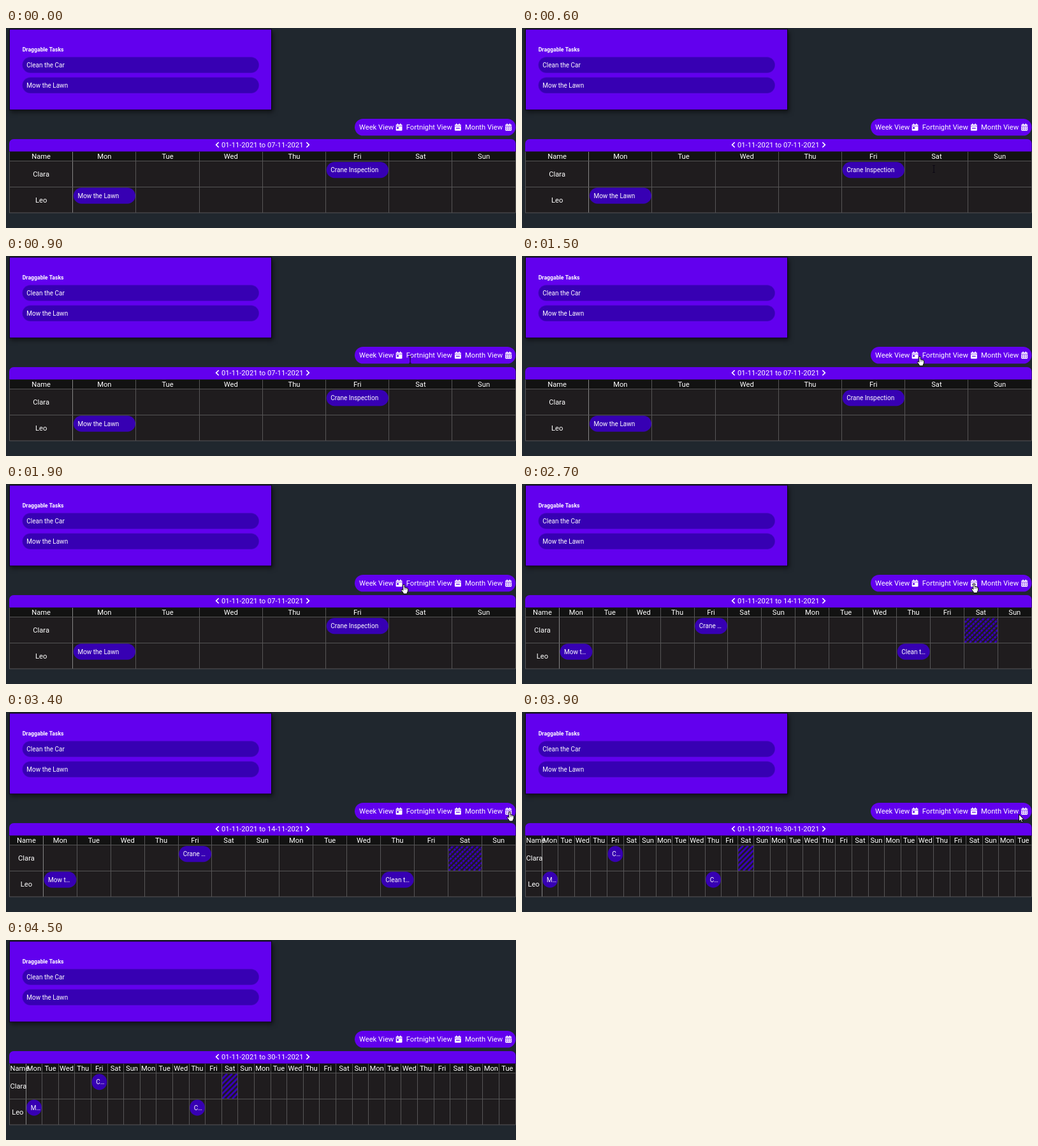
Write an HTML page with a canvas that moves like this. It is 800x315 px and loops after 5.1 s.

```html
<!DOCTYPE html>
<html lang="en">
<head>
<meta charset="utf-8">
<title>Task planner</title>
<style>
html, body { margin: 0; width: 100%; height: 100%; overflow: hidden; background: #20272e; }
canvas { display: block; width: 800px; height: 315px; }
</style>
</head>
<body>
<canvas id="stage"></canvas>
<script>
const W = 800, H = 315, LOOP = 5100, STEP = 100, LAST = 4500;
const PURPLE = '#6200ee', DEEP = '#3700b3', CELL = '#1f1c1e', HEAD = '#121212', GRID = '#565556';
const DAYS = ['Mon', 'Tue', 'Wed', 'Thu', 'Fri', 'Sat', 'Sun'];
const LEFT = 5.5, RIGHT = 799.2;
const ROWS = [{ name: 'Clara', y: 210 }, { name: 'Leo', y: 250.5 }];

const VIEWS = [
  { from: 0, days: 7, end: '07', labels: ['Crane Inspection', 'Mow the Lawn', ''] },
  { from: 2600, days: 14, end: '14', labels: ['Crane …', 'Mow t…', 'Clean t…'] },
  { from: 3600, days: 30, end: '30', labels: ['C…', 'M…', 'C…'] }
];
// day column and row of each event
const EVENTS = [[5, 0], [1, 1], [11, 1]];
const OFF_DAY = 13;

// cursor path: time, x, y
const PATH = [
  [600, 646, 222], [900, 634, 163.5], [1200, 626, 159], [1500, 624, 158], [1900, 624, 158],
  [2300, 709, 156.5], [2700, 709, 156.5], [3200, 790, 157], [3600, 790, 157],
  [3900, 779.5, 161], [4300, 748, 222]
];

const canvas = document.getElementById('stage');
const ctx = canvas.getContext('2d');
const dpr = window.devicePixelRatio || 1;
canvas.width = W * dpr;
canvas.height = H * dpr;

function rect(x, y, w, h, color) {
  ctx.fillStyle = color;
  ctx.fillRect(x, y, w, h);
}

function round(x, y, w, h, r, color) {
  ctx.beginPath();
  ctx.roundRect(x, y, w, h, r);
  ctx.fillStyle = color;
  ctx.fill();
}

function text(str, x, y, size = 11.2, align = 'left', weight = 400) {
  ctx.font = `${weight} ${size}px Roboto, Arial, sans-serif`;
  ctx.textAlign = align;
  ctx.fillStyle = '#fff';
  ctx.fillText(str, x, y);
}

function poly(points) {
  ctx.beginPath();
  points.forEach(([x, y]) => ctx.lineTo(x, y));
}

// Centred text that starts at the cell edge when it does not fit
function fitText(str, x, w, y) {
  ctx.font = '400 11.2px Roboto, Arial, sans-serif';
  const tw = ctx.measureText(str).width;
  text(str, x + Math.max(1, (w - tw) / 2), y);
}

function shadow(blur, dx, dy, color) {
  ctx.shadowBlur = blur * dpr;
  ctx.shadowOffsetX = dx * dpr;
  ctx.shadowOffsetY = dy * dpr;
  ctx.shadowColor = color;
}

function drawTasks() {
  ctx.save();
  shadow(7, 2, 3, 'rgba(0,0,0,.55)');
  rect(5, 1.5, 412, 128, '#0b0712');
  ctx.restore();
  rect(6, 2.5, 410, 126, PURPLE);
  text('Draggable Tasks', 25.7, 37.3, 8.7, 'left', 700);
  ['Clean the Car', 'Mow the Lawn'].forEach((task, i) => {
    const y = 45.5 + i * 32;
    round(25.5, y, 371.5, 25.5, 12.7, '#4a05c8');
    round(26.2, y + .7, 370.1, 24.1, 12, DEEP);
    text(task, 32.3, y + 16.3, 10);
  });
}

function calendar(x, kind) {
  const y = 150.4;
  round(x, y + 1.5, 9.9, 9.8, 1.2, '#fff');
  round(x + 2, y, 1.6, 3, .4, '#fff');
  round(x + 6.3, y, 1.6, 3, .4, '#fff');
  rect(x, y + 3.5, 9.9, .7, PURPLE);
  if (kind === 'day') rect(x + 1.5, y + 5.6, 2.8, 2.8, PURPLE);
  if (kind === 'minus') rect(x + 2, y + 6.8, 5.9, 1.3, PURPLE);
  if (kind === 'grid') {
    for (let i = 0; i < 6; i++) rect(x + 1.4 + (i % 3) * 2.8, y + 5.3 + (i > 2 ? 2.8 : 0), 1.5, 1.5, PURPLE);
  }
}

function drawButtons() {
  round(547, 143, 252.5, 26.5, 13.2, PURPLE);
  text('Week View', 554, 160.2);
  calendar(611.6, 'day');
  text('Fortnight View', 627.8, 160.2);
  calendar(703.9, 'minus');
  text('Month View', 720, 160.2);
  calendar(783.2, 'grid');
}

function chevron(x, dir) {
  ctx.strokeStyle = '#fff';
  ctx.lineWidth = 1.7;
  poly([[x - 2 * dir, 180], [x + 2 * dir, 184], [x - 2 * dir, 188]]);
  ctx.stroke();
}

function hatch(x, y, w, h, dashed) {
  ctx.save();
  ctx.beginPath();
  ctx.rect(x, y, w, h);
  ctx.clip();
  ctx.strokeStyle = DEEP;
  ctx.lineWidth = 3;
  if (dashed) ctx.setLineDash([4, 1]);
  for (let d = 0; d < w + h; d += 7.9) {
    poly([[x + d - h, y + h], [x + d, y]]);
    ctx.stroke();
  }
  ctx.restore();
}

function drawTable(view) {
  const n = view.days + 1, cw = (RIGHT - LEFT) / n;
  const colX = i => LEFT + i * cw;

  round(5, 175, 794.5, 20, [7, 7, 0, 0], PURPLE);
  chevron(331.7, -1);
  text(`01-11-2021 to ${view.end}-11-2021`, 402.2, 188.4, 11.2, 'center');
  chevron(473.3, 1);

  rect(5, 194.5, 794.5, 15.5, HEAD);
  rect(5, 210, 794.5, 81, CELL);
  hatchDay(view, colX, cw);

  for (let i = 0; i <= n; i++) {
    const x = Math.floor(colX(i));
    rect(x, 195, 1, 96, i === 1 ? '#858585' : GRID);
  }
  [209, 250, 290.5].forEach(y => rect(5, y, 794.5, 1, GRID));

  fitText('Name', LEFT, cw, 206.4);
  for (let i = 1; i < n; i++) text(DAYS[(i - 1) % 7], colX(i) + cw / 2, 206.4, 11.2, 'center');
  ROWS.forEach(row => fitText(row.name, LEFT, cw, row.y + 24.2));

  EVENTS.forEach(([day, row], i) => {
    if (day > view.days) return;
    const x = colX(day) + 1.1, y = ROWS[row].y + 1;
    round(x, y, cw - 2, 25.3, Math.min(12.6, cw / 2 - 1), DEEP);
    text(view.labels[i], x + 6.6, y + 16.1, 10);
  });
}

function hatchDay(view, colX, cw) {
  if (OFF_DAY <= view.days) hatch(colX(OFF_DAY) + .8, 210.5, cw - 1, 39.5, view.days === 14);
}

function outline(points) {
  poly(points);
  ctx.closePath();
  ctx.fillStyle = '#fff';
  ctx.strokeStyle = '#000';
  ctx.lineWidth = 1;
  ctx.lineJoin = 'round';
  ctx.fill();
  ctx.stroke();
}

const CURSORS = {
  beam() {
    ctx.strokeStyle = '#0a0612';
    ctx.lineWidth = 1;
    poly([[0, -5.5], [0, 5.5]]);
    ctx.stroke();
    [-5.5, 5.5].forEach(y => {
      poly([[-1.8, y], [1.8, y]]);
      ctx.stroke();
    });
  },
  hand() {
    outline([[-1.2, .8], [0, 0], [1.2, .8], [1.2, 5], [3, 5], [4.6, 5.6], [6.2, 6.4], [6.8, 7.6],
      [6.5, 11], [5.2, 13.2], [5.2, 15], [-.6, 15], [-1, 13.4], [-4, 9.3], [-3.4, 8], [-2.3, 8.2], [-1.2, 9.4]]);
    ctx.lineWidth = .5;
    [1.4, 3.2, 5].forEach(x => {
      poly([[x, 5.5], [x, 8.5]]);
      ctx.stroke();
    });
  },
  arrow() {
    outline([[0, 0], [0, 11.3], [2.6, 8.9], [4.3, 12.8], [6, 12], [4.4, 8.3], [7.8, 8.1]]);
  }
};

function drawCursor(t) {
  const i = PATH.findIndex(p => p[0] > t);
  if (i < 1) return;
  const [t0, x0, y0] = PATH[i - 1], [t1, x1, y1] = PATH[i];
  const u = (t - t0) / (t1 - t0), k = u * u * (3 - 2 * u);
  const kind = t < 1100 || t >= 4100 ? 'beam' : t < 3700 ? 'hand' : 'arrow';
  ctx.save();
  ctx.translate(x0 + (x1 - x0) * k, y0 + (y1 - y0) * k);
  CURSORS[kind]();
  ctx.restore();
}

function draw(now) {
  const t = Math.min(LAST, Math.floor((now % LOOP) / STEP) * STEP);
  ctx.setTransform(dpr, 0, 0, dpr, 0, 0);
  rect(0, 0, W, H, '#20272e');
  drawTasks();
  drawButtons();
  drawTable(VIEWS.filter(v => v.from <= t).pop());
  drawCursor(t);
}

const start = performance.now();
function tick() {
  draw(performance.now() - start);
  requestAnimationFrame(tick);
}
tick();
</script>
</body>
</html>
```
